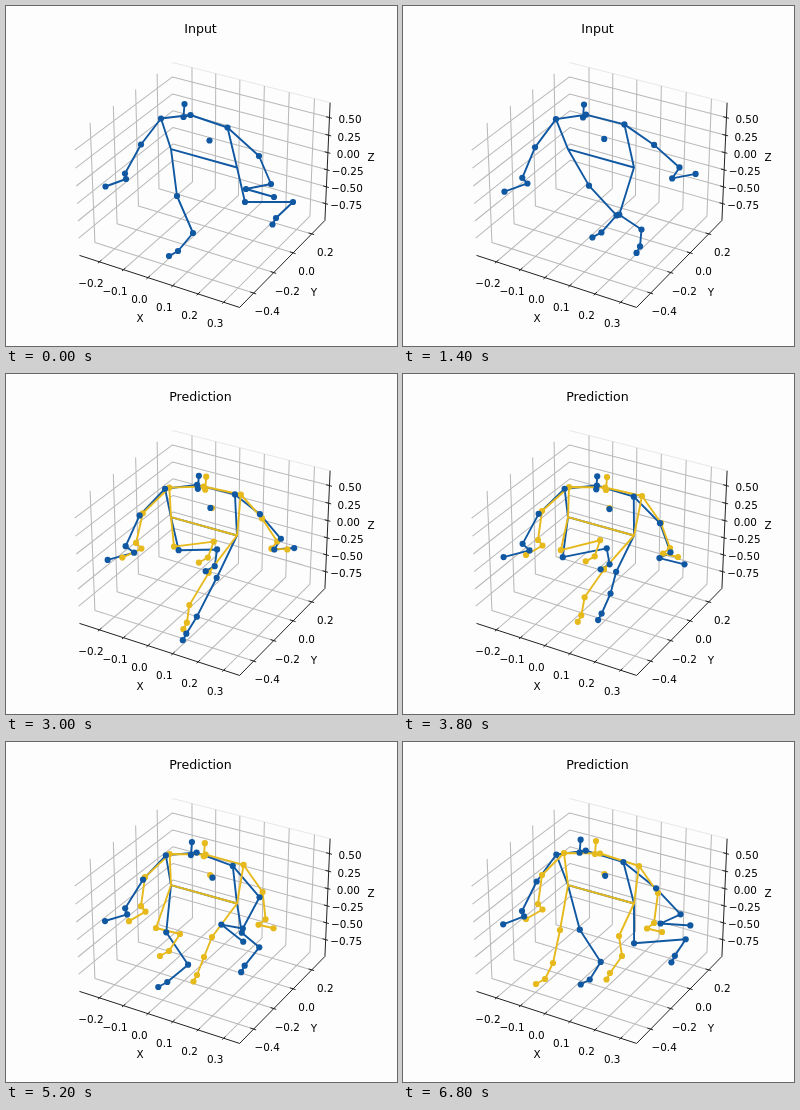
An HTML page for the animation above (7 s loop, 391x340 px).

```html
<!DOCTYPE html>
<html lang="en">
<head>
<meta charset="utf-8">
<title>Walking pose forecast</title>
<style>
  html, body { margin: 0; width: 100%; height: 100%; overflow: hidden; background: #fdfdfd; }
  svg { display: block; width: 100vw; height: 100vh; }
  text { font-family: "DejaVu Sans", sans-serif; font-size: 10.4px; text-anchor: middle; fill: #000; }
  #title { font-size: 12.6px; }
  path { fill: none; stroke-linejoin: round; }
</style>
</head>
<body>
<svg viewBox="0 0 391 340">
  <rect width="391" height="340" fill="#fdfdfd"/>
  <path id="edge" stroke="#e8e8e8"/>
  <path id="grid" stroke="#b9b9b9" stroke-width="1.05"/>
  <path id="axes" stroke="#222"/>
  <g id="labels"></g>
  <text id="title" x="194.5" y="27"></text>
  <g id="figure"></g>
</svg>
<script>
const $ = id => document.getElementById(id);
const BLUE = '#1058a2', GOLD = '#e6b91c';
const STEP = 200, COUNT = 35, FORECAST = 10;
const STRIDE = 31.5; // steps per walking cycle

function make(tag, attrs, parent) {
  const el = document.createElementNS('http://www.w3.org/2000/svg', tag);
  for (const k in attrs) el.setAttribute(k, attrs[k]);
  return parent.appendChild(el);
}

// ---- 3D axes: box fractions 0..1 seen from elevation 30, azimuth -60 ----
const elev = Math.PI / 6, azim = -Math.PI / 3;
function project(fx, fy, fz) {
  const x = (fx - .5) * 1.143, y = (fy - .5) * 1.143, z = (fz - .5) * .857;
  const ca = Math.cos(azim), sa = Math.sin(azim), ce = Math.cos(elev), se = Math.sin(elev);
  const along = x * ca + y * sa;
  const scale = 1605 / (10 - along * ce - z * se);
  return [198.4 + (y * ca - x * sa) * scale, 173.3 - (z * ce - along * se) * scale];
}
const polyline = pts => 'M' + pts.map(p => p[0].toFixed(2) + ' ' + p[1].toFixed(2)).join('L');
const line3 = (...pts) => polyline(pts.map(p => project(...p)));

let grid = '', axes = line3([0, 0, 0], [1, 0, 0], [1, 1, 0], [1, 1, 1]);
function label(text, x, y) {
  make('text', { x, y: y + 3.8 }, $('labels')).textContent = text;
}
function axis(name, count, first, gap, value, unit, digits, shift, wall, tick) {
  for (let i = 0; i < count; i++) {
    const f = first + gap * i, v = value + unit * i, zero = Math.abs(v) < 1e-6;
    grid += line3(...wall(f));
    const ends = tick(f), [x, y] = project(...ends[1]);
    axes += line3(ends[0], ends[2]);
    label((v < 0 && !zero ? '\u2212' : '') + Math.abs(v).toFixed(digits), x + shift[0], y + shift[1]);
  }
}
axis('X', 6, .13, .155, -.2, .1, 1, [-8.5, 21.3],
  f => [[f, 0, 0], [f, 1, 0], [f, 1, 1]], f => [[f, -.015, 0], [f, 0, 0], [f, .02, 0]]);
axis('Y', 4, .153, .227, -.4, .2, 1, [13.5, 18.5],
  f => [[1, f, 0], [0, f, 0], [0, f, 1]], f => [[1.015, f, 0], [1, f, 0], [.98, f, 0]]);
axis('Z', 6, .148, .146, -.75, .25, 2, [20.5, 1.7],
  f => [[0, 0, f], [0, 1, f], [1, 1, f]], f => [[1.015, 1, f], [1, 1, f], [.98, 1, f]]);
$('edge').setAttribute('d', line3([0, 1, 1], [1, 1, 1]));
$('grid').setAttribute('d', grid);
$('axes').setAttribute('d', axes);
label('X', 134, 312);
label('Y', 308, 286);
label('Z', 365, 151);

// ---- Motion rules: each returns a function of the step number ----
const blend = (pts, weights) => [0, 1].map(c => pts.reduce((sum, p, i) => sum + p[c] * weights[i], 0));
const mix = (a, b, s) => blend([a, b], [1 - s, s]);
const fixed = (x, y) => () => [x, y];
const rigid = (joint, dx, dy) => t => joint(t).map((v, c) => v + (c ? dy : dx));

// Periodic path through an odd number of points, evenly spaced over one stride.
const cycle = (...pts) => t => blend(pts, pts.map((_, i) => {
  const n = pts.length, a = Math.PI * (t / STRIDE - i / n), s = Math.sin(a);
  return Math.abs(s) < 1e-6 ? 1 : Math.sin(n * a) / (n * s);
}));

// Forecast torso and arms: leave the last seen pose, settle, then drift slowly.
const settle = (joint, rest, drift) => t => {
  const u = Math.min(1, (t - FORECAST) / 8);
  const late = (t - 19) / 15;
  const goal = rest.map((v, c) => v + drift[c] * late);
  return mix(joint(FORECAST), goal, u * u * (3 - 2 * u));
};

// Forecast legs: one cubic from the last seen pose through three more.
const glide = (joint, ...pts) => t => {
  const s = (t - FORECAST) / 8;
  return blend([joint(FORECAST), ...pts], [0, 1, 2, 3].map(i =>
    [0, 1, 2, 3].reduce((w, j) => j === i ? w : w * (s - j) / (i - j), 1)));
};

const actual = {
  chin: cycle([177.5, 111], [185.5, 113], [192, 115]),
  neck: cycle([184.5, 109], [186, 109.5], [194, 111.5]),
  chest: cycle([203.5, 134.5], [202, 133], [207, 135.5]),
  shoulderR: cycle([155, 112.5], [155, 114], [162, 114.5]),
  elbowR: cycle([135, 138.5], [132, 142], [136.5, 139]),
  wristR: cycle([119, 167.5], [119.5, 173], [119.5, 168.5]),
  thumbR: cycle([120, 173], [127, 179], [125, 175]),
  handR: cycle([99.5, 180.5], [102, 187], [100, 181.5]),
  shoulderL: cycle([221.5, 121.5], [224.5, 118.5], [230.5, 123.5]),
  elbowL: cycle([253, 150], [251.5, 140], [251.5, 136.5], [257, 149], [254, 155.5]),
  wristL: cycle([265, 178], [278, 163], [272, 159], [268, 178], [237, 187]),
  thumbL: cycle([240, 183], [269, 174], [268, 170], [257, 184], [217, 183]),
  handL: cycle([268, 191], [294, 170], [285, 166], [282, 190], [239, 200]),
  kneeR: cycle([171, 190], [185, 181], [181, 174], [160, 183], [159, 190]),
  ankleR: cycle([187, 227], [212, 211], [214, 187], [204, 174], [184, 218]),
  ballR: cycle([172, 245], [198, 228], [203, 204], [207, 190], [165, 235]),
  kneeL: cycle([239, 196], [218, 208], [211, 207], [213, 198], [233, 191]),
  ankleL: cycle([287, 196], [247, 218], [191, 250], [207, 220], [247, 206]),
  ballL: cycle([270, 212], [245, 235], [183, 266], [198, 240], [234, 225])
};

const guess = {};
function rest(drift, pose) {
  for (const name in pose) guess[name] = settle(actual[name], pose[name], drift);
}
rest([-11, -4], { chin: [203, 116] });
rest([-5, -2], { neck: [202, 113.5], chest: [206.5, 134], shoulderR: [166, 113] });
rest([0, -4], { elbowR: [139, 137], wristR: [135, 166], thumbR: [139.5, 171.5], handR: [123, 181] });
rest([-3, 2], { shoulderL: [239, 122], elbowL: [258, 149] });
rest([-16, 7], { wristL: [267, 174], thumbL: [260, 179.5], handL: [275, 183] });
Object.assign(guess, {
  kneeR: glide(actual.kneeR, [160, 175], [150, 186], [157, 188]),
  ankleR: glide(actual.ankleR, [200, 165], [174, 192], [150, 221]),
  ballR: glide(actual.ballR, [195, 181], [163, 209], [142, 237]),
  kneeL: glide(actual.kneeL, [201, 196], [206, 195], [216, 194]),
  ankleL: glide(actual.ankleL, [181, 225], [198, 215], [219, 214]),
  ballL: glide(actual.ballL, [178, 243], [191, 233], [207, 231])
});

for (const body of [actual, guess]) {
  body.head = rigid(body.chin, 1, -13);
  body.toeR = rigid(body.ballR, -9, 5);
  body.toeL = rigid(body.ballL, -3.5, 6.5);
  body.hipR = fixed(165, 143.2);
  body.hipL = fixed(231, 161.5);
}

const side = s => [
  ['neck', 'shoulder' + s, 'elbow' + s, 'wrist' + s, 'thumb' + s, 'hand' + s],
  ['shoulder' + s, 'hip' + s, 'knee' + s, 'ankle' + s, 'ball' + s, 'toe' + s]
];
const chains = [['head', 'chin', 'neck'], ['hipR', 'hipL'], ...side('R'), ...side('L')];

// ---- Drawing ----
const fig = $('figure');
const bones = color => make('path', { stroke: color, 'stroke-width': 1.9 }, fig);
function dots(joints, color) {
  const group = make('g', { fill: color }, fig);
  const list = Object.keys(joints).filter(name => !name.startsWith('hip'))
    .map(name => [joints[name], make('circle', { r: 3.1 }, group)]);
  return { group, list };
}
const blueBones = bones(BLUE), goldBones = bones(GOLD);
const goldDots = dots(guess, GOLD), blueDots = dots(actual, BLUE);

function pose(joints, path, marks, t) {
  path.setAttribute('d', chains.map(c => polyline(c.map(name => joints[name](t)))).join(''));
  for (const [at, el] of marks.list) {
    const [x, y] = at(t);
    el.setAttribute('cx', x);
    el.setAttribute('cy', y);
  }
}

let shown = -1;
function draw(ms) {
  const t = Math.floor(ms / STEP) % COUNT;
  if (t === shown) return;
  shown = t;
  const forecast = t >= FORECAST;
  $('title').textContent = forecast ? 'Prediction' : 'Input';
  goldBones.style.display = goldDots.group.style.display = forecast ? 'inline' : 'none';
  pose(actual, blueBones, blueDots, t);
  if (forecast) pose(guess, goldBones, goldDots, t);
}

const start = performance.now();
function loop() {
  draw(performance.now() - start);
  requestAnimationFrame(loop);
}
loop();
</script>
</body>
</html>
```
